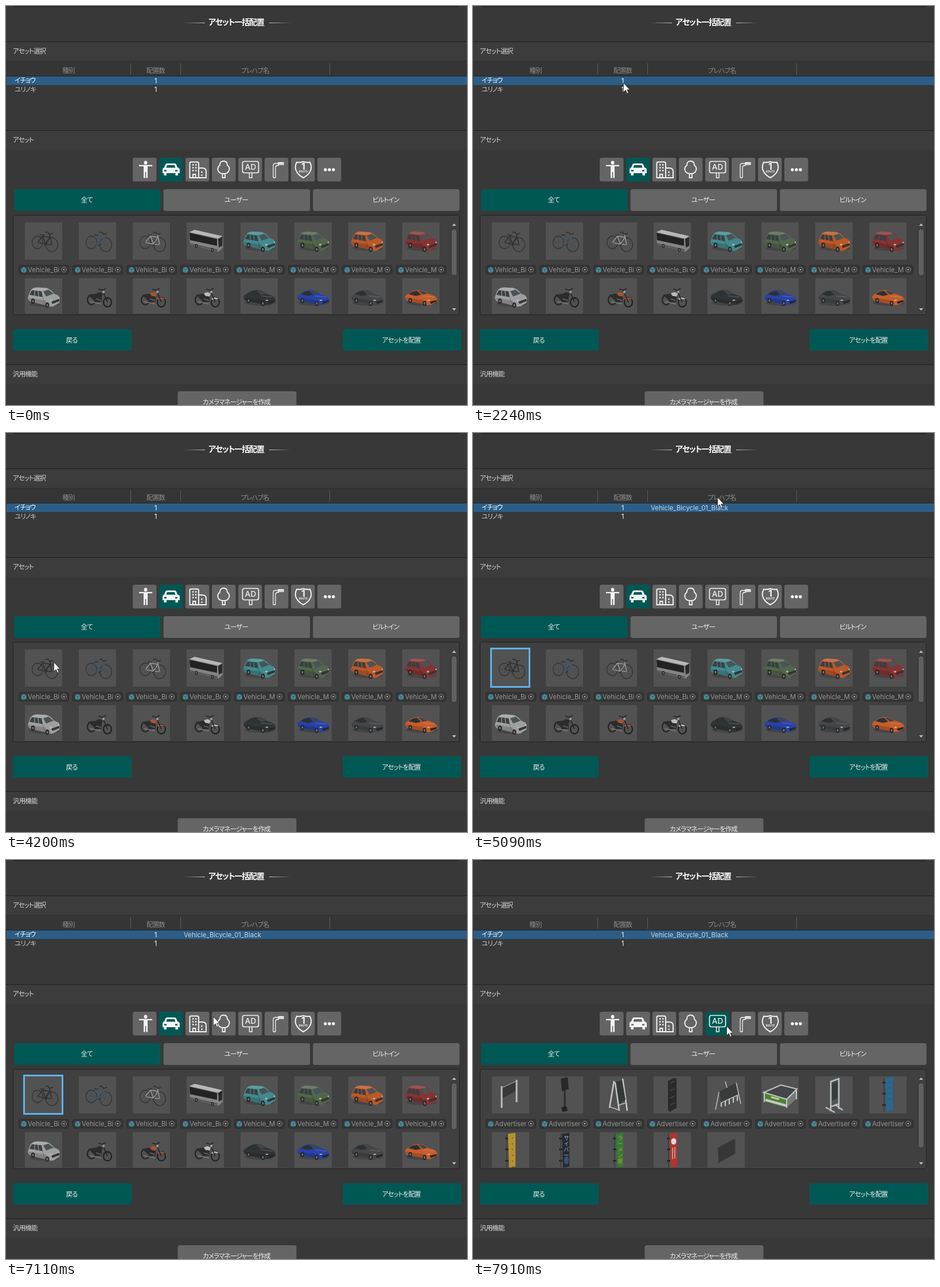
Recreate the animation shown at these times as an HTML page. Size 804x697 px, loop 7990 ms.

```html
<!DOCTYPE html>
<html lang="ja">
<head>
<meta charset="utf-8">
<style>
html, body { margin: 0; width: 100%; height: 100%; overflow: hidden; background: #383838; }
svg { display: block; }
text { font: 11.6px "Noto Sans CJK JP", "Noto Sans CJK", sans-serif; font-feature-settings: "palt"; letter-spacing: -.08em; }
.latin { font: 11.4px Inter, sans-serif; letter-spacing: 0; }
</style>
</head>
<body>
<svg id="stage" width="804" height="697" viewBox="0 0 804 697"></svg>
<script>
const TEAL = '#005855', GRAY = '#656565', TILE = '#525252';

// Markup helpers
const rect = (x, y, w, h, fill, r = 0, more = '') =>
  `<rect x="${x}" y="${y}" width="${w}" height="${h}" rx="${r}" fill="${fill}" ${more}/>`;
const fill = (d, color, more = '') => `<path d="${d}" fill="${color}" ${more}/>`;
const line = (d, color, w = 1, more = '') =>
  `<path d="${d}" fill="none" stroke="${color}" stroke-width="${w}" ${more}/>`;
const oval = (x, y, rx, ry, color) => `<ellipse cx="${x}" cy="${y}" rx="${rx}" ry="${ry}" fill="${color}"/>`;
const ring = (x, y, rx, ry, color, w = 1) =>
  `<ellipse cx="${x}" cy="${y}" rx="${rx}" ry="${ry}" fill="none" stroke="${color}" stroke-width="${w}"/>`;
const text = (s, x, y, color = '#dcdcdc', anchor = 'middle', more = '') =>
  `<text x="${x}" y="${y + 4.3}" fill="${color}" text-anchor="${anchor}" ${more}>${s}</text>`;
const latin = (s, x, y, color, anchor = 'start', more = '') => text(s, x, y, color, anchor, 'class="latin" ' + more);
const at = (x, y, content, more = '') => `<g transform="translate(${x} ${y})" ${more}>${content}</g>`;
const button = (label, x, y, w, h, color) => rect(x, y, w, h, color, 3.5) + text(label, x + w / 2 - 1, y + 19, '#eee');
const band = (label, y) => rect(0, y, 804, 34, '#3c3c3c') + rect(0, y, 804, 1, '#202020') + text(label, 12, y + 17, '#d8d8d8', 'start');

// Vehicle thumbnails, drawn in a 65px square
const wheel = (x, y, r) => oval(x, y, r, r * 1.35, '#1c1c1c') + oval(x, y, r * .5, r * .75, '#707070');

const bike = color => ring(22, 35, 9.5, 11, '#303030', 1.3) + ring(47, 39, 10.5, 12, '#303030', 1.4) +
  line('M22 35L31 24 44 26 36 38 31 24M22 35L36 38 47 39 43 20', color, 1.5) +
  line('M13 35H31M22 25V46M38 31L55 47M55 31L38 47', '#454545', .5) +
  line('M27 22H34M36 18Q40 15 43 21L49 19M34 41L39 37', '#292929', 1.6);

const bus = () => fill('M5 17L14 13 62 24 63 44 56 51 6 39Z', '#8d8d8d') +
  fill('M5 17L14 13 62 24 55 28Z', '#c9c9c9') + fill('M5 18L53 29V41L6 31Z', '#1c1c1c') +
  fill('M55 29L62 25V41L56 44Z', '#242424') + fill('M6 36L54 47V50L6 39Z', '#5c5c5c') +
  wheel(17, 41, 2.5) + wheel(45, 48, 2.5);

const van = color => oval(34, 45, 26, 5, '#444') +
  fill('M5 34L9 23Q11 17 21 16L37 17Q44 18 51 27L58 30Q62 34 60 43L50 49Q45 51 39 48L10 41Q6 39 5 34Z', color) +
  fill('M11 20Q15 16 21 16L37 17 42 20 30 22Z', '#ffffff30') +
  fill('M8 29L12 21 29 23 31 33Z', '#343e41') + fill('M32 23L41 20 50 27 37 32Z', '#47555a') +
  line('M17 22L17 31M23 22L24 32', color, 1.2) +
  fill('M6 34L36 39 40 48 10 41Z', '#00000030') + line('M31 33L34 45', '#0005', .8) +
  fill('M46 41L60 36V40L48 45Z', '#303030') + oval(45, 39, 2.2, 1.4, '#c8c8c8') + oval(59, 35, 1.2, 1.4, '#c8c8c8') +
  wheel(14, 40, 3.3) + wheel(39, 47, 3.5);

const motorbike = color => ring(22, 38, 7, 8.5, '#1c1c1c', 2.1) + ring(50, 42, 7, 8, '#1c1c1c', 2.3) +
  fill('M16 29L29 27 40 32 40 41 30 42Z', '#262626') + fill('M30 27Q36 22 42 27L40 32 33 31Z', color) +
  fill('M43 36Q49 31 56 36L53 37Q48 35 45 38Z', color) + line('M50 42L41 21M34 19L41 21 47 18', '#1d1d1d', 1.6) +
  line('M20 41L39 45M30 36L39 39', '#858585', 1.3) + oval(43, 24, 2, 2.3, '#aaa');

const sedan = color => oval(34, 43, 27, 5, '#424242') +
  fill('M5 33Q7 28 13 26Q20 20 31 21Q38 21 45 27L56 31Q62 34 61 41L52 46Q46 48 40 46L10 40Q6 38 5 33Z', color) +
  fill('M11 28Q18 22 26 22L33 29 24 31Z', '#262c2f') + fill('M28 22Q37 21 44 27L36 29Z', '#3d454a') +
  fill('M6 34L36 38 40 46 10 40Z', '#00000030') + line('M36 31L56 33', '#ffffff40', 1) +
  fill('M48 41L60 38V41L50 45Z', '#202020') + oval(46, 38.5, 2.5, 1, '#c8c8c8') +
  wheel(14, 39, 3.1) + wheel(39, 44, 3.3);

// Advertisement thumbnails
const banner = (color, ink, label) => line('M26 3V62', '#333', 1.3) + line('M23 11H29M23 30H29M23 50H29', '#222', 3) +
  fill('M28 3L41 1 41 60 30 62Z', color) +
  [...label].map((c, i) => text(c, 35.5, 9 + i * 10, ink, 'middle', 'style="font-size:9px"')).join('');

const ads = [
  fill('M17 21L43 9V25L17 39Z', '#343434') + line('M17 17V55M43 6V45', '#d0d0d0', 3) + line('M17 20L43 8', '#aaa', 1.3),
  fill('M26 4L38 1 40 22 28 26Z', '#222') + line('M33 24V55', '#272727', 3) + fill('M27 54L36 52 38 60 29 62Z', '#1b1b1b'),
  line('M25 8L17 55M40 4L48 60M27 10L34 60', '#d8d8d8', 2.6) + fill('M28 9L39 7 45 41 34 48Z', '#2e3436') +
    line('M17 53L34 59M34 50L46 46', '#ccc', 1.6),
  fill('M25 8L37 2 40 5 40 55 28 62 25 59Z', '#242424') + line('M29 12L37 8M29 25L37 21M29 38L37 34M29 50L37 46', '#444', 1.5),
  fill('M20 27L50 11 54 32 24 46Z', '#353938') + line('M24 46L54 32M20 27L14 58M50 11L58 48M34 20L31 9', '#c8c8c8', 1.6) +
    line('M24 46V53M31 43V52M38 40V49M45 37V46M52 34V43', '#e0e0e0', 2),
  fill('M4 28L34 15 62 22 44 40Z', '#424546') + fill('M4 28L44 40V55L6 44Z', '#4d8b31') + fill('M44 40L61 24V39L44 55Z', '#79847b') +
    line('M4 28L34 15 62 22 44 40ZM44 40V55M5 28V45M61 23V40', '#dadada', 2) + line('M7 41L43 51', '#ddd', 4) +
    line('M17 36L31 40', '#d8e39e', 3),
  line('M27 9L41 4V48L27 53Z', '#c9d2d8', 2.6) + fill('M29 13L39 9V38L29 42Z', '#343839') +
    line('M27 52V61M41 47V57M18 54L34 63M34 49L48 59', '#c9d2d8', 2.4),
  banner('#226c9c', '#174564', '・・・・・・'),
  banner('#c79d27', '#5c471a', '・・・・・・'),
  banner('#20242e', '#b7c5dc', 'サイバー') + oval(36, 49, 4, 7, '#354f80'),
  banner('#2f8131', '#dda43a', 'ラーメン屋'),
  banner('#c42e2b', '#eee', '') + oval(35, 16, 4.5, 5.5, '#eee') + line('M33 27V47M37 26V46', '#e5bdba', 1.5),
  fill('M18 27L48 11 49 37 19 54Z', '#333') + line('M18 27L48 11V37', '#454545', 1.2)
];

const vehicles = [
  bike('#272727'), bike('#3f5870'), bike('#a6a6a6'), bus(),
  van('#409499'), van('#536a4b'), van('#d05a1f'), van('#8f2f2d'),
  van('#acacac'), motorbike('#252525'), motorbike('#b85230'), motorbike('#cecece'),
  sedan('#2b3032'), sedan('#2340b4'), sedan('#434547'), sedan('#dc5f24')
];

const label = name => rect(-10.5, 75, 87, 15.5, '#363636', 3, 'stroke="#2b2b2b"') +
  fill('M-2 78L2.5 80V86L-2 88.500-6.500 86V80Z', '#4a8d9d') + line('M-6 80.500L-2 82.500 2 80.500M-2 82.500V88', '#2c5965', 1) +
  latin(name, 5, 83, '#959595', 'start', 'clip-path="url(#label)"') +
  ring(68, 82.5, 4.3, 4.3, '#8c8c8c') + oval(68, 82.5, 1.6, 1.6, '#999');

const list = (pictures, names, thumbHeight) => pictures.map((p, i) => at(33 + i % 8 * 94, i < 8 ? 378 : 475.5,
    rect(0, 0, 65, i < 8 ? 65 : 62, TILE) + `<g opacity=".86">${p}</g>` + (i < 8 ? label(names[i]) : ''))).join('') +
  rect(776.5, 389.5, 10, thumbHeight, '#606060', 4.5, 'stroke="#2b2b2b"');

// Category icons, drawn in a 42px tile
const W = '#f4f4f4';
const icons = [
  oval(22.5, 8.7, 2.9, 3.2, W) + fill('M11 12.800H34V15H26V35.500H23.300V25H21.700V35.500H19V15H11Z', W),
  fill('M11 12Q11.600 10 14 10H27Q29.400 10 30 12L32 17Q36 18 36 21V27H33V31H28.500V27H13V31H8.500V27H6V21Q6 18 9 17ZM14 13L12.500 17.500H28.500L27 13ZM9 21.500V24H13V21.500ZM28 21.500V24H32V21.500Z', W, 'fill-rule="evenodd"'),
  line('M7.500 35V10Q7.500 7.500 10 7.500H20Q23 7.500 23 10V35ZM23 18H29Q36 18 36 24V35H23M13 35V29H17.500V35', W, 1.9) +
    line('M12 12.500H20M12 17.500H20M12 22.500H20', W, 2.3, 'stroke-dasharray="2.400 2.600"') + line('M28.500 24V32', W, 2.3, 'stroke-dasharray="2.400 3"'),
  line('M20.500 6Q27 6 27 13Q33 18 29 24Q27 28 21 28Q14 28 11.500 24Q8 18 14 13Q14 6 20.500 6ZM18.500 28V35H23V28', W, 1.8),
  rect(7.5, 6.5, 28, 20, 'none', 3, `stroke="${W}" stroke-width="1.7"`) + latin('AD', 21.5, 17, W, 'middle', 'style="font-size:13.5px;font-weight:500"') +
    line('M19.500 27V35H24V27', W, 1.5),
  line('M15 35V14Q15 10 19 10H32M19 35V17Q19 14 22 13.500H25M15 35H19M24 8.500H33V12H24Z', W, 1.3),
  line('M21.500 7Q28 9 33 8Q37 16 34 22.500Q31 30 21.500 35Q12 30 9 22.500Q6 16 10 8Q15 9 21.500 7Z', W, 2) +
    latin('1', 21.5, 16.5, W, 'middle', 'style="font-size:16px;font-weight:700"') + latin('ROUTE', 21.5, 22, W, 'middle', 'style="font-size:4.5px;font-weight:700"'),
  oval(14, 21, 2.7, 2.7, W) + oval(21, 21, 2.7, 2.7, W) + oval(28, 21, 2.7, 2.7, W)
];

const stage = document.getElementById('stage');
stage.innerHTML = `<defs>
    <linearGradient id="rule"><stop stop-color="#ccc" stop-opacity="0"/><stop offset="1" stop-color="#ccc"/></linearGradient>
    <clipPath id="label"><rect x="0" y="74" width="60" height="20"/></clipPath>
  </defs>` +
  rect(0, 0, 804, 697, '#383838') + line('M13 0Q15 1 19 1H785Q789 1 791 0', '#202020', 1.5) +
  rect(309, 29, 38, 1, 'url(#rule)') + `<g transform="translate(806 0) scale(-1 1)">${rect(309, 29, 38, 1, 'url(#rule)')}</g>` +
  text('アセット一括配置', 401.5, 29, '#fff', 'middle', 'style="font-size:14px;font-weight:700"') +
  band('アセット選択', 62) + rect(0, 96, 804, 27, '#353535') + rect(0, 96, 804, 1, '#2e2e2e') + rect(0, 122, 804, 1, '#242424') +
  [217, 304, 564].map(x => rect(x, 100, 1, 20, '#606060')).join('') +
  text('種別', 109, 113, '#8c8c8c') + text('配置数', 261, 113, '#8c8c8c') + text('プレハブ名', 434, 113, '#8c8c8c') +
  rect(1, 123, 803, 15, '#2c5d87') +
  text('イチョウ', 15, 130, '#fff', 'start') + text('ユリノキ', 15, 145.5, '#c8c8c8', 'start') +
  latin('1', 261, 131, '#fff', 'middle') + latin('1', 261, 146, '#fff', 'middle') +
  band('アセット', 217) +
  icons.map((icon, i) => at(221 + 46 * i, 265, rect(0, 0, 41.5, 41.5, GRAY, 3.5, `id="tile${i}"`) + icon)).join('') +
  ['全て', 'ユーザー', 'ビルトイン'].map((s, i) => button(s, 14 + 260.7 * i, 320, 255.5, 38, i ? GRAY : TEAL)).join('') +
  rect(12.5, 365.5, 778, 174, '#404040', 3, 'stroke="#212121"') +
  fill('M778 384H785L781.500 380ZM778 528H785L781.500 532Z', '#c4c4c4') +
  `<g id="vehicles">${list(vehicles, [...Array(3).fill('Vehicle_Bi'), 'Vehicle_Bu', ...Array(4).fill('Vehicle_M')], 81.5)}</g>` +
  `<g id="ads">${list(ads, Array(8).fill('Advertisem'), 113.5)}</g>` +
  `<g id="chosen">${latin('Vehicle_Bicycle_01_Black', 310, 131, '#ccd7e1')}</g>` +
  rect(31.5, 376.5, 67, 67, 'none', 0, 'id="frame" stroke="#5fb2ee" stroke-width="3"') +
  button('戻る', 12, 564.5, 207, 37.5, TEAL) + button('アセットを配置', 587, 564.5, 207, 37.5, TEAL) +
  band('汎用機能', 626) + button('カメラマネージャーを作成', 299.5, 673, 207, 40, GRAY) +
  `<g id="pointer"><circle id="press" r="11" fill="#d2cb1e" fill-opacity=".85"/>` +
  fill('M.5 .5V16.500L4.200 13 6.800 19 9.200 18 6.700 12.200H11.500Z', '#fff', 'stroke="#222" stroke-width=".8"') + '</g>';

// Pointer stops: time, x, y
const path = [
  [580, 447, 566], [1080, 306, 152], [1360, 290, 120], [1430, 290, 121], [1570, 286, 128], [2170, 286, 128],
  [2240, 262, 134], [2600, 92, 303], [2990, 260, 131], [3060, 270, 128], [3730, 270, 128], [4200, 83, 400],
  [4810, 83, 400], [5090, 426, 112], [5220, 426, 112], [5560, 412, 139], [6480, 412, 139], [6550, 402, 143],
  [6900, 312, 250], [7260, 390, 286], [7320, 390, 287], [7460, 442, 290]
];
const presses = [[1840, 1970], [3390, 3520], [4480, 4550], [7660, 7910]];
const LOOP = 7990, PICK = 4550, SWITCH = 7910;

function pointerAt(t) {
  const next = path.findIndex(p => p[0] > t);
  if (next < 1) return path[next < 0 ? path.length - 1 : 0].slice(1);
  const [t0, x0, y0] = path[next - 1], [t1, x1, y1] = path[next];
  let k = (t - t0) / (t1 - t0);
  if (t1 - t0 > 200) k = k * k * (3 - 2 * k);
  return [x0 + (x1 - x0) * k, y0 + (y1 - y0) * k].map(Math.round);
}

const $ = id => document.getElementById(id);
const show = (id, on) => $(id).setAttribute('visibility', on ? 'visible' : 'hidden');

function draw(now) {
  const t = now % LOOP, switched = t >= SWITCH;
  show('vehicles', !switched);
  show('ads', switched);
  show('chosen', t >= PICK);
  show('frame', t >= PICK && !switched);
  $('tile1').setAttribute('fill', switched ? GRAY : TEAL);
  $('tile4').setAttribute('fill', switched ? TEAL : GRAY);
  const visible = t >= path[0][0];
  show('pointer', visible);
  show('press', visible && presses.some(([from, to]) => t >= from && t < to));
  $('pointer').setAttribute('transform', `translate(${pointerAt(t)})`);
  requestAnimationFrame(draw);
}
draw(performance.now());
</script>
</body>
</html>
```
